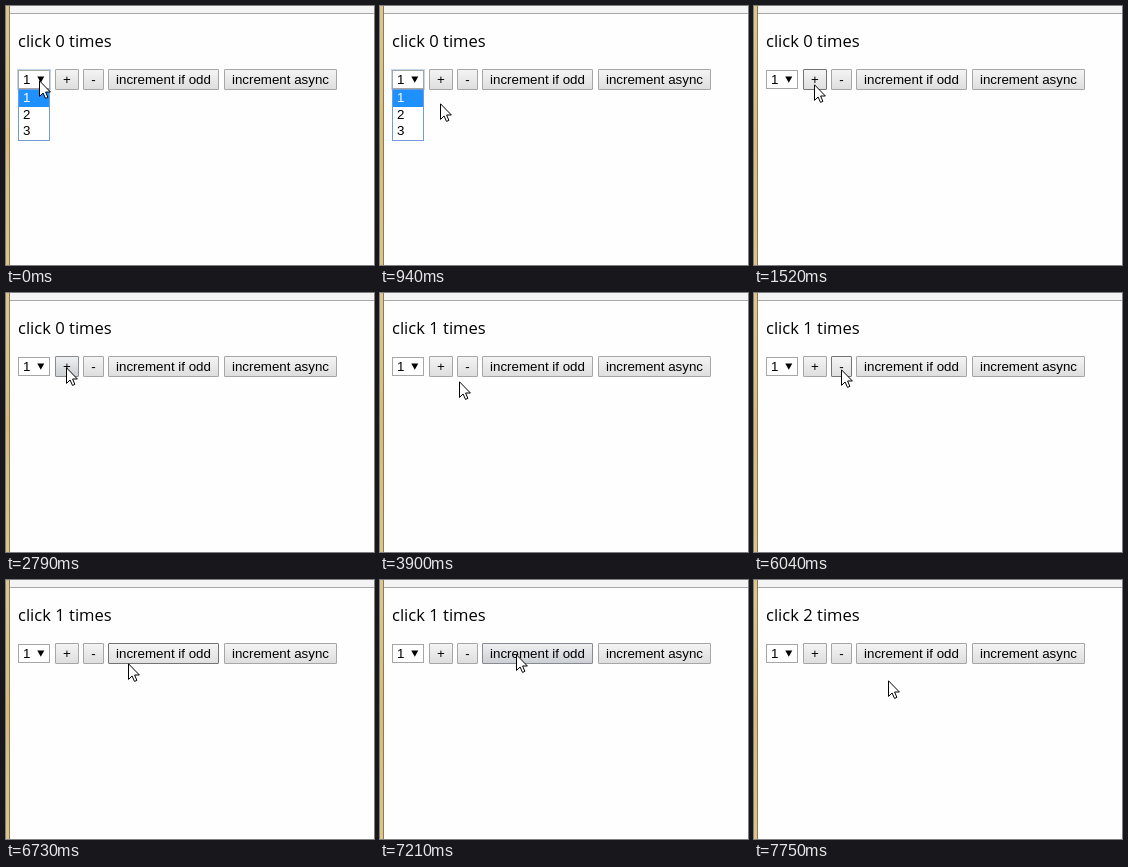
Write an HTML page that moves like this. It is 368 px wide and 259 px high and loops after 8 s.

```html
<!DOCTYPE html>
<html lang="en">
<head>
<meta charset="utf-8">
<title>Click counter</title>
<style>
  html, body { margin: 0; width: 100%; height: 100%; overflow: hidden; background: #fefefe; }
  body { position: relative; font: 13.333px/19px "Liberation Sans", Arial, sans-serif; color: #000; }
  body * { box-sizing: border-box; }
  body > * { position: absolute; }

  .count, .count i, button, .list, .ring, .cursor { animation: 8s step-end infinite; }

  /* window edges */
  .side { left: 0; top: 0; width: 4px; height: 259px; border-right: 1px solid #8a7a58;
          background: linear-gradient(#dcc88f, #d8bd78 50%, #dcc586); }
  .bar { left: 4px; top: 0; width: 364px; height: 8px; background: #f4f4f4; border-bottom: 1px solid #a8a8a8; }

  .label { left: 12px; top: 23px; font: 16.6px/23px "Open Sans", "Noto Sans", sans-serif; white-space: pre; }
  .count { display: inline-grid; }
  .count i { grid-area: 1 / 1; font-style: normal; opacity: 0; }
  .zero { animation-name: zero !important; }
  .one { animation-name: one !important; }
  .two { animation-name: two !important; }

  button { top: 63px; height: 21px; margin: 0; padding: 0; font: inherit; color: inherit;
           border: 1px solid #a6a6a6; border-radius: 1px; text-align: center; white-space: nowrap;
           background: #dedede linear-gradient(#fffa, #fff0); appearance: none; pointer-events: none; }
  .plus { left: 49px; width: 24px; animation-name: plus; }
  .minus { left: 77px; width: 21px; animation-name: minus; }
  .odd { left: 102px; width: 111px; animation-name: odd; }
  .async { left: 218px; width: 113px; }

  .select { left: 12px; top: 64px; width: 32px; height: 19px; border: 1px solid #a6a6a6;
            padding-left: 4px; line-height: 18px; background: #fff; }
  .select svg { position: absolute; left: 18px; top: 5px; }
  .ring { left: 11px; top: 63px; width: 34px; height: 21px; border: 1px solid #c3d6f0; animation-name: list; }
  .list { left: 12px; top: 83px; width: 32px; height: 52px; border: 1px solid #6f9bd8; background: #fff;
          animation-name: list; }
  .list div { height: 16.6px; padding-left: 4px; line-height: 16.6px; }
  .list div:first-child { background: #1e90ff; color: #fff; }

  .cursor { left: 0; top: 0; animation-name: move; }

  @keyframes list { 0% { opacity: 1 } 13.625%, 100% { opacity: 0 } }

  @keyframes zero { 0% { opacity: 1 } 38.25%, 100% { opacity: 0 } }
  @keyframes one { 0%, 59.5%, 92%, 100% { opacity: 0 } 38.25%, 75.5% { opacity: 1 } }
  @keyframes two { 0%, 75.5% { opacity: 0 } 59.5%, 92%, 100% { opacity: 1 } }

  /* idle, hover and pressed looks */
  @keyframes plus {
    0%, 45.25%, 63.25%, 100% { background-color: #dedede; border-color: #a6a6a6 }
    19%, 38.25%, 52.5%, 59.5% { background-color: #e0e0e0; border-color: #747474 }
    34.875%, 57.875% { background-color: #ccd0d4; border-color: #858b90 }
  }
  @keyframes minus {
    0%, 52.5%, 79.25%, 100% { background-color: #dedede; border-color: #a6a6a6 }
    50.625%, 68.125%, 75.5% { background-color: #e0e0e0; border-color: #747474 }
    73.5% { background-color: #ccd0d4; border-color: #858b90 }
  }
  @keyframes odd {
    0%, 95.375%, 100% { background-color: #dedede; border-color: #a6a6a6 }
    84.125%, 92% { background-color: #e0e0e0; border-color: #747474 }
    90.125% { background-color: #ccd0d4; border-color: #858b90 }
  }

  @keyframes move {
    0% { transform: translate(33px, 74px); opacity: 1 }
    6.625% { transform: translate(33px, 74px); opacity: 0 }
    8.375% { transform: translate(44px, 80px); opacity: 1 }
    9.875% { transform: translate(53px, 87px) }
    11.75% { transform: translate(60px, 97px) }
    17.125% { transform: translate(60px, 87px) }
    19% { transform: translate(60px, 78px) }
    20.5% { transform: translate(60px, 74px) }
    43.375% { transform: translate(66px, 96px) }
    45.25% { transform: translate(69px, 101px) }
    47.125% { transform: translate(75px, 96px) }
    48.75% { transform: translate(79px, 88px) }
    50.625% { transform: translate(84px, 83px) }
    52.5% { transform: translate(63px, 77px) }
    54.375% { transform: translate(59px, 75px) }
    63.25% { transform: translate(70px, 93px) }
    65.125% { transform: translate(74px, 90px) }
    66.625% { transform: translate(78px, 86px) }
    68.125% { transform: translate(82px, 81px) }
    70% { transform: translate(87px, 76px) }
    79.25% { transform: translate(97px, 96px) }
    80.75% { transform: translate(105px, 95px) }
    82.625% { transform: translate(114px, 89px) }
    84.125% { transform: translate(122px, 83px) }
    85.625% { transform: translate(129px, 78px) }
    87.125% { transform: translate(134px, 75px) }
    88.625% { transform: translate(136px, 74px) }
    93.875% { transform: translate(136px, 82px) }
    95.375% { transform: translate(135px, 92px) }
    96.875%, 100% { transform: translate(134px, 100px); opacity: 1 }
  }
</style>
</head>
<body>
  <div class="side"></div>
  <div class="bar"></div>
  <div class="label">click <span class="count"><i class="zero">0</i><i class="one">1</i><i class="two">2</i></span> times</div>

  <div class="ring"></div>
  <div class="select">1
    <svg width="8" height="8"><path d="M.3 .5H7.3L3.8 6.8Z"/></svg>
  </div>
  <button class="plus">+</button>
  <button class="minus">-</button>
  <button class="odd">increment if odd</button>
  <button class="async">increment async</button>

  <div class="list"><div>1</div><div>2</div><div>3</div></div>

  <svg class="cursor" width="12" height="19">
    <path d="M.5 .8V16.4L4.1 13L6.5 18.4L8.9 17.4L6.6 12H11.4Z" fill="#fff" stroke="#000"/>
  </svg>
</body>
</html>
```
